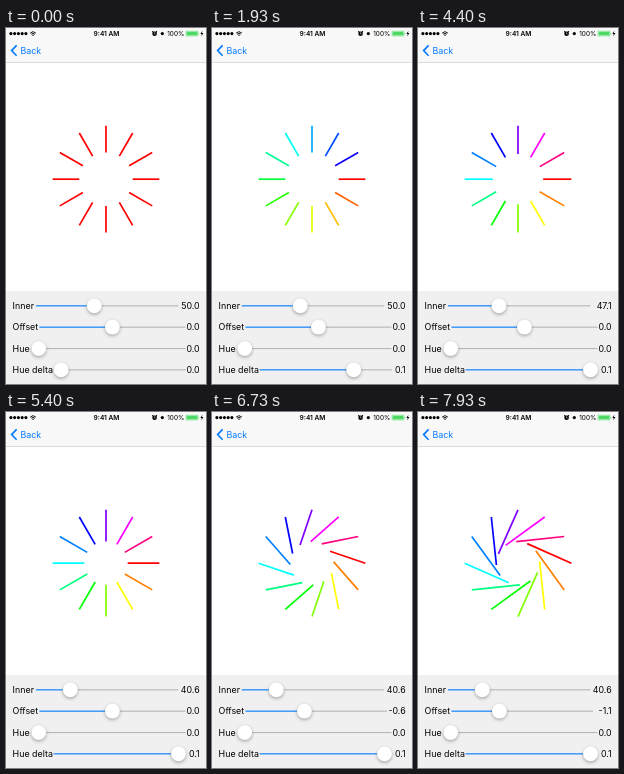
An HTML page with a canvas for the animation above (8 s loop, 200 by 356 pixels).

```html
<!DOCTYPE html>
<html lang="en">
<head>
<meta charset="utf-8">
<title>Radial lines</title>
<style>
  html, body { margin: 0; width: 100%; height: 100%; overflow: hidden; background: #fff; }
  canvas { display: block; width: 200px; height: 356px; }
</style>
</head>
<body>
<canvas id="stage"></canvas>
<script>
const W = 200, H = 356, LOOP = 8000, STEP = 1000 / 15;
const BLUE = '#007aff', FONT = 'Inter, "Liberation Sans", sans-serif';
const canvas = document.getElementById('stage');
const ctx = canvas.getContext('2d');
const dpr = window.devicePixelRatio || 1;
canvas.width = W * dpr;
canvas.height = H * dpr;
ctx.scale(dpr, dpr);

// [time, value] stops for each dragged slider
const DELTA = [[330, 0], [530, 0.05], [870, 0.28], [1930, 0.737], [2600, 0.975], [2800, 1]];
const INNER = [[3930, 50], [4130, 49.2], [5130, 41.6], [5400, 40.6]];
const OFFSET = [[6070, 0], [6200, -0.06], [6730, -0.58], [7500, -1.07], [7800, -1.13]];

function at(stops, t) {
  if (t <= stops[0][0]) return stops[0][1];
  for (let i = 1; i < stops.length; i++) {
    const [t0, a] = stops[i - 1], [t1, b] = stops[i];
    if (t < t1) return a + (b - a) * (t - t0) / (t1 - t0);
  }
  return stops[stops.length - 1][1];
}

function text(str, x, y, size, color = '#000', align = 'left', weight = 400) {
  ctx.font = `${weight} ${size}px ${FONT}`;
  ctx.textAlign = align;
  ctx.textBaseline = 'alphabetic';
  ctx.fillStyle = color;
  ctx.fillText(str, x, y);
}

function disc(x, y, r, color) {
  ctx.fillStyle = color;
  ctx.beginPath();
  ctx.arc(x, y, r, 0, Math.PI * 2);
  ctx.fill();
}

function path(points, color, width) {
  ctx.strokeStyle = color;
  ctx.lineWidth = width;
  ctx.beginPath();
  points.forEach(([x, y]) => ctx.lineTo(x, y));
  ctx.stroke();
}

function statusBar() {
  for (let i = 0; i < 5; i++) disc(4.9 + i * 3.75, 5.6, 1.55, '#000');

  // wireless signal fan
  const lo = -Math.PI * 0.75, hi = -Math.PI * 0.25;
  ctx.strokeStyle = '#000';
  ctx.lineWidth = 0.9;
  for (const r of [2.5, 4.1]) {
    ctx.beginPath();
    ctx.arc(27, 8, r, lo, hi);
    ctx.stroke();
  }
  ctx.fillStyle = '#000';
  ctx.beginPath();
  ctx.moveTo(27, 8);
  ctx.arc(27, 8, 1.4, lo, hi);
  ctx.fill();

  text('9:41 AM', 100.5, 8, 6.6, '#000', 'center', 600);

  // alarm clock
  disc(148.6, 5.8, 2.3, '#000');
  disc(146.8, 3.7, 0.8, '#000');
  disc(150.4, 3.7, 0.8, '#000');
  path([[148.6, 4.3], [148.6, 6], [149.7, 6]], '#fff', 0.5);

  disc(156.3, 5.6, 1.6, '#000');
  text('100%', 178.2, 8, 6.4, '#000', 'right');

  // battery and charging bolt
  ctx.strokeStyle = '#4cd964';
  ctx.lineWidth = 0.5;
  ctx.strokeRect(180, 3.1, 11.8, 4.9);
  ctx.fillStyle = '#4cd964';
  ctx.fillRect(180.6, 3.7, 10.6, 3.7);
  ctx.fillRect(192.3, 4.7, 0.8, 1.7);
  ctx.fillStyle = '#000';
  ctx.beginPath();
  [[196.4, 2.8], [194.4, 6], [195.8, 6], [195.2, 8.4], [197.4, 5], [196, 5]]
    .forEach(([x, y]) => ctx.lineTo(x, y));
  ctx.fill();
}

function navBar() {
  ctx.fillStyle = '#f8f8f8';
  ctx.fillRect(0, 0, W, 34);
  ctx.fillStyle = '#b8b8b8';
  ctx.fillRect(0, 34, W, 0.5);
  statusBar();
  path([[10.6, 17.4], [5.6, 22.6], [10.6, 27.8]], BLUE, 1.6);
  text('Back', 14.4, 25.8, 8.9, BLUE);
}

function burst(inner, offset, delta) {
  const cx = 100, cy = 151.2, unit = 0.5337;
  const point = (r, a) => [cx + r * unit * Math.cos(a), cy + r * unit * Math.sin(a)];
  for (let i = 0; i < 12; i++) {
    const a = i * Math.PI / 6;
    path([point(inner, a + offset), point(100, a)], `hsl(${i * delta * 360}, 100%, 50%)`, 1.7);
  }
}

function slider(label, y, left, right, fraction, value) {
  const r = 7.5;
  const x = left + r + fraction * (right - left - 2 * r);
  text(label, 6.6, y + 3.2, 8.9);
  text(value.toFixed(1), 193.6, y + 3.2, 8.8, '#000', 'right');
  ctx.fillStyle = '#b6b6b6';
  ctx.fillRect(x, y - 0.5, right - x, 1.1);
  ctx.fillStyle = BLUE;
  ctx.fillRect(left, y - 0.5, x - left, 1.1);
  ctx.save();
  ctx.shadowColor = 'rgba(0, 0, 0, 0.3)';
  ctx.shadowBlur = 3.5 * dpr;
  ctx.shadowOffsetY = 1.4 * dpr;
  disc(x, y, r, '#fff');
  ctx.restore();
  ctx.strokeStyle = 'rgba(0, 0, 0, 0.1)';
  ctx.lineWidth = 0.3;
  ctx.stroke();
}

function draw(t) {
  const inner = at(INNER, t), offset = at(OFFSET, t), share = at(DELTA, t);
  const delta = share / 12;

  ctx.fillStyle = '#fff';
  ctx.fillRect(0, 0, W, H);
  navBar();
  burst(inner, offset, delta);

  ctx.fillStyle = '#f0f0f0';
  ctx.fillRect(0, 263, W, H - 263);
  slider('Inner', 277.8, 29.8, 172.2, (inner - 30) / 50, inner);
  slider('Offset', 299.1, 33.4, offset < 0 ? 175 : 179.5, 0.5 + offset / (2 * Math.PI), offset);
  slider('Hue', 320.5, 25.2, 179.5, 0, 0);
  slider('Hue delta', 341.8, 47.6, 180, share, delta);
}

function frame(now) {
  const t = now % LOOP;
  draw(Math.floor((t + 5) / STEP) * STEP % LOOP);
  requestAnimationFrame(frame);
}
draw(0);
requestAnimationFrame(frame);
</script>
</body>
</html>
```
